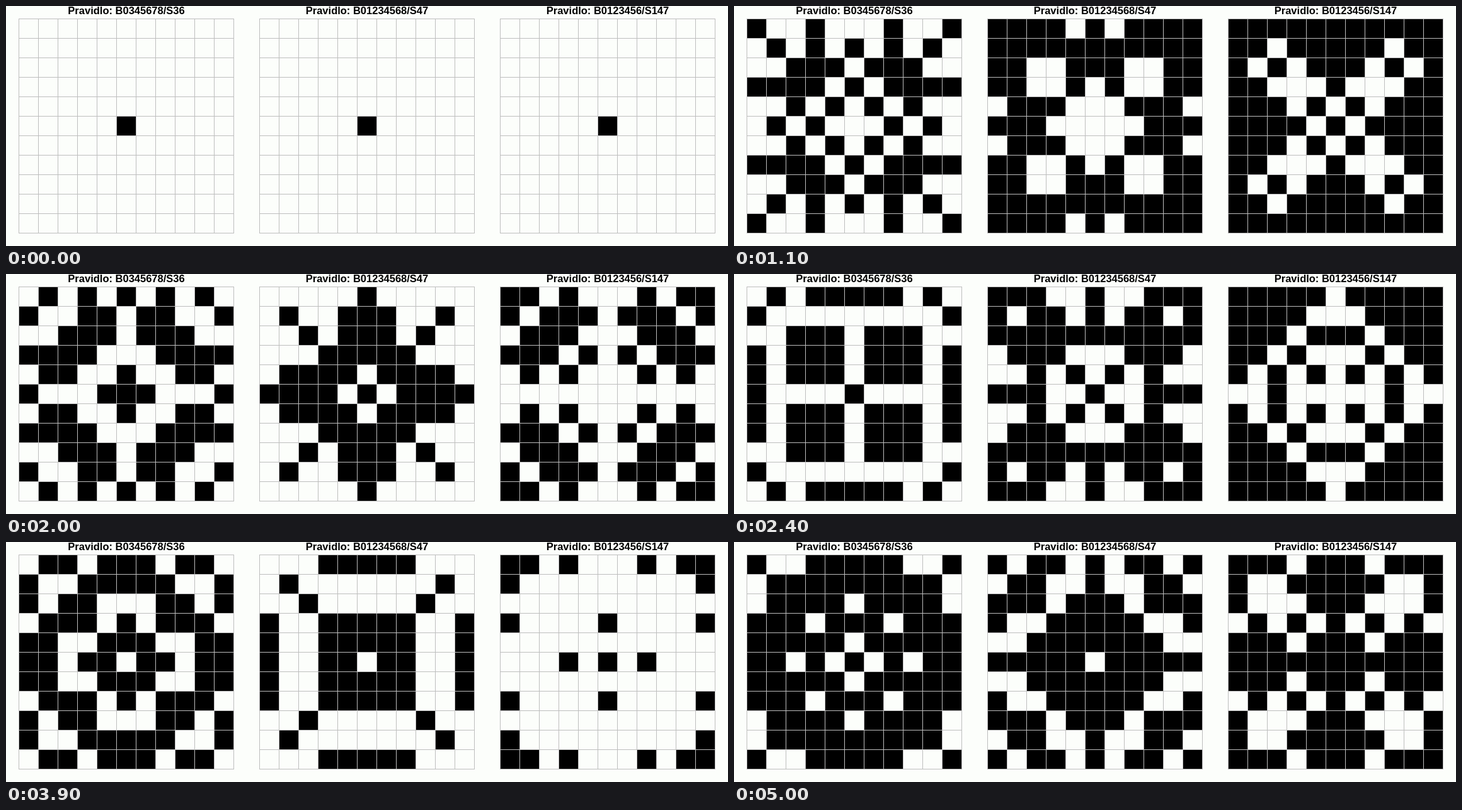
An HTML page for the animation above (5.1 s loop, 1146 by 382 pixels).

```html
<!DOCTYPE html>
<html lang="cs">
<head>
<meta charset="utf-8">
<title>Pravidla</title>
<style>
html, body { margin: 0; width: 100%; height: 100%; overflow: hidden; background: #fcfefb; }
svg { display: block; }
text { font: bold 16.5px "Liberation Sans", Arial, sans-serif; text-anchor: middle; }
path { shape-rendering: crispEdges; }
</style>
</head>
<body>
<svg id="stage" width="1146" height="382"></svg>
<script>
const N = 11, CELL = 31, EDGE = 20, PANEL = 382, STEP = 100, STEPS = 51;
const RULES = ["B0345678/S36", "B01234568/S47", "B0123456/S147"];
const stage = document.getElementById("stage");

function add(tag, attrs, text = "") {
  const el = document.createElementNS("http://www.w3.org/2000/svg", tag);
  for (const key in attrs) el.setAttribute(key, attrs[key]);
  el.textContent = text;
  return stage.appendChild(el);
}

const rect = (x, y, w, h) => `M${x} ${y}h${w}v${h}h${-w}z`;
const wrap = i => (i + N) % N;

// One generation on a torus
function evolve(cells, born, stay) {
  return cells.map((alive, i) => {
    const x = i % N, y = (i - x) / N;
    let count = -alive;
    for (let dy = -1; dy <= 1; dy++)
      for (let dx = -1; dx <= 1; dx++)
        count += cells[wrap(y + dy) * N + wrap(x + dx)];
    return +(alive ? stay : born).includes(count);
  });
}

function drawCells(cells, left) {
  return cells.map((alive, i) => alive
    ? rect(left + i % N * CELL, EDGE + Math.floor(i / N) * CELL, CELL, CELL)
    : "").join("");
}

const panels = RULES.map((rule, k) => {
  const left = EDGE + k * PANEL, size = N * CELL + 1;
  const [born, stay] = rule.split("/").map(part => part.slice(1));
  let cells = Array(N * N).fill(0);
  cells[(N * N - 1) / 2] = 1;
  const poses = [];
  for (let g = 0; g < STEPS; g++) {
    poses.push(drawCells(cells, left));
    cells = evolve(cells, born, stay);
  }

  const path = add("path", { fill: "#000" });
  let grid = "";
  for (let i = 0; i <= N; i++)
    grid += rect(left + i * CELL, EDGE, 1, size) + rect(left, EDGE + i * CELL, size, 1);
  add("path", { d: grid, fill: "#bebebe" });
  add("text", { x: left + 171, y: 13 }, "Pravidlo: " + rule);
  return { path, poses };
});

let shown = -1;
function frame() {
  const g = Math.floor(performance.now() / STEP) % STEPS;
  if (g !== shown) {
    shown = g;
    for (const { path, poses } of panels) path.setAttribute("d", poses[g]);
  }
  requestAnimationFrame(frame);
}
frame();
</script>
</body>
</html>
```
